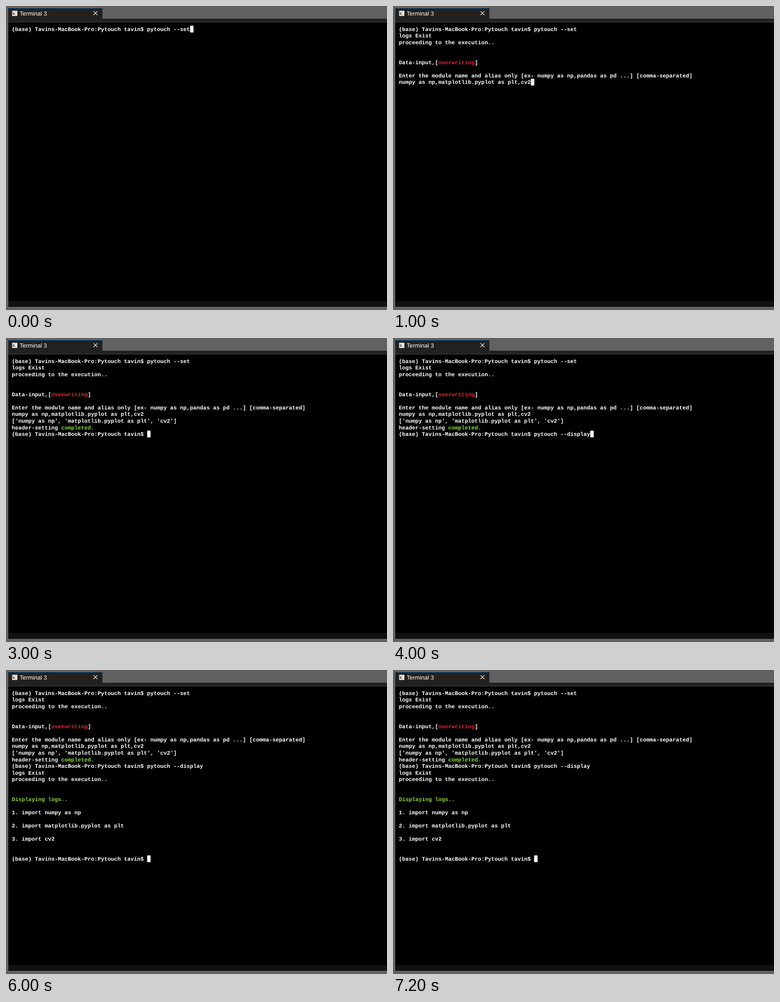
Animation of 838x668 px, one loop 8000 ms. Source, as an HTML page:

```html
<!DOCTYPE html>
<html lang="en">
<head>
<meta charset="utf-8">
<title>Terminal</title>
<style>
  html, body { margin: 0; width: 100%; height: 100%; overflow: hidden; background: #616161; }
  svg { display: block; width: 838px; height: 668px; }
  text { white-space: pre; text-rendering: geometricPrecision; }
  #rows { font: bold 12.1px "Liberation Mono", monospace; fill: #fff; }
  .red { fill: #e0282b; }
  .green { fill: #86dc32; }
  .label { font: 13px "Liberation Sans", sans-serif; fill: #fff; }
  .icon { font: bold 7px "Liberation Mono", monospace; fill: #222; }
</style>
</head>
<body>
<svg viewBox="0 0 838 668">
  <rect width="838" height="668" fill="#616161"/>
  <rect x="5" y="28" width="833" height="8" fill="#212121"/>
  <rect x="5" y="35" width="833" height="1" fill="#444"/>
  <rect x="5" y="4" width="207" height="25" fill="#212121"/>
  <rect x="5" y="3.5" width="207" height="1.5" fill="#1c7cc4"/>
  <rect x="13.5" y="10.5" width="11.5" height="11.5" fill="#e4e4e4"/>
  <text class="icon" x="14.8" y="18.5">$_</text>
  <text class="label" x="30" y="20.5">Terminal 3</text>
  <path d="M192.5 11.5l8.5 8.5m0-8.5l-8.5 8.5" stroke="#eee" stroke-width="1.2"/>
  <rect x="5" y="36" width="833" height="612" fill="#000"/>
  <rect x="5" y="648" width="833" height="13" fill="#111"/>
  <g id="rows"></g>
  <rect id="cursor" width="7.5" height="14.8" fill="#fff"/>
</svg>
<script>
const LOOP = 8000, LEFT = 12.7, BASE = 54.9, COL = 7.262, ROW = 14.56;
const rows = document.getElementById('rows');
const cursor = document.getElementById('cursor');

const prompt = '(base) Tavins-MacBook-Pro:Pytouch tavin$ ';
const modules = ['numpy as np', 'matplotlib.pyplot as plt', 'cv2'];
const started = '\nlogs Exist\nproceeding to the execution..\n\n\n';

// {r:...} and {g:...} mark red and green text.
const setCommand = prompt + 'pytouch --set';
const input = setCommand + started + 'Data-input,[{r:overwriting}]\n\n' +
  'Enter the module name and alias only [ex- numpy as np,pandas as pd ...] [comma-separated]\n' +
  modules.join(',');
const done = input + '\n[' + modules.map(m => `'${m}'`).join(', ') +
  ']\nheader-setting {g:completed.}\n' + prompt;
const display = done + 'pytouch --display';
const listing = display + started + '{g:Displaying logs..}\n\n' +
  modules.map((m, i) => `${i + 1}. import ${m}\n\n`).join('') + '\n' + prompt;

const steps = [[0, setCommand], [1000, input], [3000, done], [4000, display], [6000, listing]];

function make(tag, attrs, parent) {
  const el = document.createElementNS('http://www.w3.org/2000/svg', tag);
  for (const key in attrs) el.setAttribute(key, attrs[key]);
  return parent.appendChild(el);
}

function draw(screen) {
  rows.replaceChildren();
  const lines = screen.split('\n');
  lines.forEach((line, i) => {
    if (!line) return;
    const text = make('text', { x: LEFT, y: BASE + i * ROW }, rows);
    for (const part of line.split(/(\{[rg]:[^}]*\})/)) {
      const mark = part.match(/^\{([rg]):(.*)\}$/);
      const span = make('tspan', mark ? { class: mark[1] === 'r' ? 'red' : 'green' } : {}, text);
      span.textContent = mark ? mark[2] : part;
    }
  });
  const last = lines.length - 1;
  cursor.setAttribute('x', LEFT + lines[last].length * COL);
  cursor.setAttribute('y', BASE - 11.5 + last * ROW);
}

let shown;
function update(now) {
  const t = now % LOOP;
  const screen = steps.filter(([start]) => start <= t).pop()[1];
  if (screen !== shown) draw(shown = screen);
}

const origin = performance.now();
function tick() {
  update(performance.now() - origin);
  requestAnimationFrame(tick);
}
tick();
</script>
</body>
</html>
```
